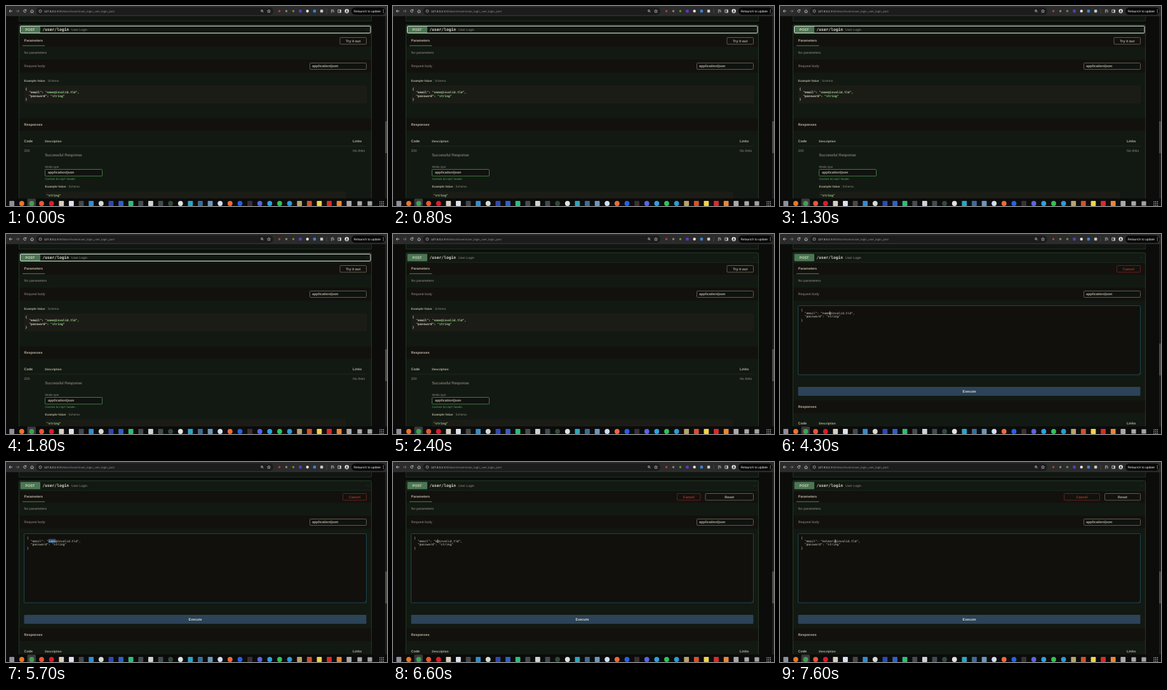
Animation of 600 by 314 pixels, one loop 8 s. Source, as an HTML page:

```html
<!DOCTYPE html>
<html lang="en">
<head>
<meta charset="utf-8">
<title>API docs</title>
<style>
html, body { margin: 0; width: 100%; height: 100%; overflow: hidden; background: #0c0d0b; }
svg { display: block; width: 100vw; height: 100vh; }
text { font: 5.4px "Liberation Sans", Arial, sans-serif; fill: #918d80; text-rendering: geometricPrecision; white-space: pre; }
.b { font-weight: 700; font-size: 5.45px; fill: #b8b29e; }
.s { font-size: 4.7px; }
.mid { text-anchor: middle; }
.mono { font: 4.7px "DejaVu Sans Mono", monospace; fill: #d6d1c0; }
.code { font-weight: 700; }
.str { fill: #98cf8c; }
.box { fill: none; stroke: #5e5c50; }
.band { fill: #12110d; }
.rule { stroke: #263024; stroke-width: .6; }
.ico { fill: none; stroke: #c6c8ca; stroke-width: .9; }
</style>
</head>
<body>
<svg viewBox="0 0 600 314" preserveAspectRatio="none">
  <rect width="600" height="314" fill="#0c0d0b"/>

  <!-- end of the block above -->
  <path d="M20.5 15V23.5H575.5V15" fill="#111611" stroke="#26382a" stroke-width=".8"/>

  <!-- login block -->
  <rect x="20.5" y="29.5" width="555" height="290" rx="1.5" fill="#121912" stroke="#2b432c" stroke-width=".8"/>
  <path d="M21 45H575.5" class="rule" style="stroke:#263a28"/>
  <rect x="22.5" y="31.3" width="31.5" height="11.4" rx="1" fill="#4b7754"/>
  <text x="38" y="39" class="b mid" style="fill:#d8d6c4">POST</text>
  <text x="57.5" y="39.3" class="mono code" style="font-size:6.27px">/user/login</text>
  <text x="103" y="38.9" style="font-size:5.15px">User Login</text>
  <path d="M567 38.2l2.4-2.2 2.4 2.2" fill="none" stroke="#2c382c" stroke-width=".7"/>
  <rect id="focus" x="22.5" y="31.5" width="551.5" height="11" rx="1.2" fill="none" stroke="#e6e6e0"/>

  <rect x="21" y="45.4" width="554" height="18.4" class="band"/>
  <text x="28.5" y="56.4" class="b">Parameters</text>
  <rect x="26" y="61.8" width="35.3" height="1.1" fill="#4a7c52"/>
  <text x="28.5" y="75.3">No parameters</text>
  <rect x="21" y="84" width="554" height="20.5" class="band"/>
  <text x="28.5" y="96.1">Request body</text>
  <rect x="478.5" y="89.5" width="89" height="10" rx="1" class="box" style="fill:#0f120e"/>
  <text x="482" y="96.3" class="b">application/json</text>
  <g id="buttons"></g>

  <g id="view">
    <text x="28.5" y="119.4" class="b s">Example Value</text>
    <path d="M63.6 114.5v6" class="rule"/>
    <text x="66" y="119.4" class="s">Schema</text>
    <rect x="28.5" y="125" width="539.5" height="28" rx="1" fill="#1c1c17"/>
    <text x="30.6" y="131.7" class="mono code">{</text>
    <text x="30.6" y="137.2" class="mono code">  "email": <tspan class="str">"name@invalid.tld"</tspan>,</text>
    <text x="30.6" y="142.8" class="mono code">  "password": <tspan class="str">"string"</tspan></text>
    <text x="30.6" y="148.3" class="mono code">}</text>
  </g>

  <g id="edit">
    <rect id="area" x="28.5" y="112.5" width="539" height="108.5" rx="1" fill="#11100c" stroke-width=".8"/>
    <path d="M564.5 220l2-2M566 220l.6-.6" stroke="#66645c" stroke-width=".4"/>
    <g id="body">
      <rect id="sel" x="66.8" y="120.8" width="11.4" height="6.2" fill="#29537c"/>
      <text x="33" y="120.7" class="mono">{</text>
      <text x="33" y="126" class="mono" id="email"></text>
      <text x="33" y="131.3" class="mono">  "password": "string"</text>
      <text x="33" y="136.5" class="mono">}</text>
      <rect id="caret" y="121.3" width=".7" height="5.6" fill="#e2ddcc"/>
    </g>
    <rect x="28.5" y="240" width="539" height="14" rx="1" fill="#2c4358"/>
    <text x="298" y="248.9" class="b mid" style="fill:#e0dccf">Execute</text>
  </g>

  <!-- responses -->
  <g id="resp">
    <rect x="21" y="176.5" width="554" height="19.5" class="band"/>
    <text x="28.5" y="188.1" class="b">Responses</text>
    <text x="28.5" y="213.6" class="b">Code</text>
    <text x="61.2" y="213.6" class="b" style="font-size:4.8px">Description</text>
    <text x="546" y="213.6" class="b">Links</text>
    <path d="M28.5 220H568" class="rule"/>
    <text x="28.5" y="229">200</text>
    <text x="61.2" y="235.8" style="font-size:6.08px;fill:#a09a88">Successful Response</text>
    <text x="546" y="229" style="font-style:italic">No links</text>
    <text x="61.5" y="253.8" style="font-size:4.45px">Media type</text>
    <rect x="61.5" y="256.5" width="90" height="10.5" rx="1" class="box" style="fill:#0f120e;stroke:#437a49"/>
    <text x="66" y="263.4" class="b">application/json</text>
    <text x="61.5" y="272.9" style="font-size:4.3px;fill:#6da26c">Controls <tspan style="font-family:'DejaVu Sans Mono',monospace">Accept</tspan> header.</text>
    <text x="61.5" y="285.3" class="b s">Example Value</text>
    <path d="M96.3 280.5v6" class="rule"/>
    <text x="98.6" y="285.3" class="s">Schema</text>
    <rect x="61.5" y="291.5" width="474" height="20" rx="1" fill="#1c1c17"/>
    <text x="64" y="298.8" class="mono code str">"string"</text>
  </g>

  <!-- page scrollbar -->
  <rect x="597" y="16" width="3" height="287" fill="#1e1f1d"/>
  <rect id="thumb" x="597" width="3" height="50" fill="#4c4d49"/>

  <!-- browser bar -->
  <rect width="600" height="16" fill="#2b2b2b"/>
  <rect x="47" y="2.2" width="374" height="11.8" rx="5.9" fill="#1c1c1d"/>
  <path class="ico" d="M10 8H5.2m2-2.2L5 8l2.2 2.2M31.4 6.7A2 2 0 1 0 31.6 8.6M31.7 5.3v1.8h-1.8M38.6 8.1l2.4-2.2 2.4 2.2M39.3 7.8v2.4h3.4V7.8"/>
  <path class="ico" d="M15.8 8h4.8m-2-2.2L20.8 8l-2.2 2.2" style="stroke:#77797b"/>
  <circle class="ico" cx="54" cy="8" r="2" style="stroke-width:.7"/>
  <text x="60" y="9.7" style="font-size:4.47px;fill:#8f9297"><tspan fill="#e4e5e7">127.0.0.1</tspan>:8000/docs#/users/user_login_user_login_post</text>
  <circle class="ico" cx="403" cy="7.5" r="1.4"/>
  <path class="ico" d="M404 8.5l1.5 1.5M414 5.6l.7 1.6 1.8.2-1.4 1.2.5 1.8-1.6-1-1.6 1 .5-1.8-1.4-1.2 1.8-.2z" style="stroke-width:.7"/>
  <g id="addons"></g>
  <path d="M505 4v8" stroke="#55575a" stroke-width=".6"/>
  <path class="ico" d="M511.8 6.2h4.2M511.8 8h2.6M511.8 9.8h2M516 7v3M522.8 6h4.6v4.2h-4.6z"/>
  <path d="M525.6 6h2v4.2h-2z" fill="#c6c8ca"/>
  <circle cx="536.7" cy="8" r="3.2" fill="#f0f0ee"/>
  <circle cx="536.7" cy="7" r="1.1" fill="#34363a"/>
  <path d="M534.7 10a2 1.8 0 0 1 4 0z" fill="#34363a"/>
  <rect x="544" y="2.5" width="53.5" height="11.2" rx="5.6" fill="#070707"/>
  <text x="547.6" y="9.8" style="font-size:4.88px;fill:#f4f4f4">Relaunch to update</text>
  <path d="M594.3 5.4v1m0 1.1v1m0 1.1v1" stroke="#e8eaed"/>

  <!-- dock -->
  <rect y="302" width="600" height="12" fill="#0b0b0b"/>
  <rect x="33.5" y="302.5" width="13.5" height="11.5" rx="1.5" fill="#3a3a3a"/>
  <g id="dock"></g>
</svg>
<script>
const $ = id => document.getElementById(id);
const show = (id, on) => $(id).setAttribute('display', on ? 'inline' : 'none');

// "o" is a round icon, "s" a square one
const icon = (spec, x, y, r) => spec[0] === 'o'
  ? `<circle cx="${x}" cy="${y}" r="${r}" fill="${spec.slice(1)}"/>`
  : `<rect x="${x - r}" y="${y - r}" width="${2 * r}" height="${2 * r}" rx=".8" fill="${spec.slice(1)}"/>`;
const row = (list, x, step, y, r) =>
  list.split(' ').map((spec, i) => icon(spec, x + i * step, y, r)).join('');

$('addons').innerHTML = row('o#a8483c o#8c817c o#5f9445', 430.5, 11, 8, 1.8) +
  row('s#5a3cc0 o#e2e2e2 s#3f7fd0 s#c6c8ca', 463.5, 11.2, 8, 2.2);
$('dock').innerHTML = row(
  's#8f8e9c o#ee7428 o#40a055 o#ee5630 o#dc1c28 s#d9cfc0 s#dfe3ee s#45484a s#2f8dd2 o#d4dcd4 ' +
  's#2c49b4 s#2f60c4 s#2bbf76 s#454c4e s#cdd5d6 s#3e4c50 o#2f4a3a o#dfe4e2 s#2aa6c6 s#3c6c96 ' +
  's#6a97bb o#d2dff0 o#f0693a o#2462e4 s#3a3034 o#5865e4 o#2ca2e0 o#2ec456 o#2a9cd8 s#b8a468 ' +
  's#d4512c s#eed648 s#da2a2a s#ee8630 s#a9aaa9', 9.2, 15.62, 310, 3.9) +
  row('s#a9aaa9 s#a2a3a3', 557, 16, 310, 3.6);
for (let i = 0; i < 9; i++)
  $('dock').innerHTML += icon('s#dcdcdc', 589 + i % 3 * 2.7, 307.3 + (i / 3 | 0) * 2.7, .75);

const mix = (a, b, k) => `rgb(${a.map((v, i) => Math.round(v + (b[i] - v) * k))})`;
const grey = [94, 92, 80], red = [104, 32, 28], pale = [184, 178, 158], rose = [170, 54, 44];
const button = (label, x, right, edge, ink) =>
  `<rect x="${x}" y="49.5" width="${right - x}" height="10.5" rx="1" class="box" style="stroke:${edge}"/>` +
  `<text x="${(x + right) / 2}" y="56.5" class="b mid" style="fill:${ink}">${label}</text>`;

function buttons(t) {
  const g = mix(grey, grey, 0), p = mix(pale, pale, 0);
  if (t < 2700) return button('Try it out', 526, 567.5, g, p);
  const k = Math.min(1, (t - 2700) / 300);
  const edge = mix(grey, red, k), ink = mix(pale, rose, k);
  if (t < 6600) return button('Cancel', 530.5, 567.5, edge, ink);
  const u = Math.min(1, (t - 6600) / 300), split = 484 + 19.5 * (1 - (1 - u) ** 2);
  return button('Cancel', 447.5, split, edge, ink) + button('Reset', split + 8, 567.5, g, p);
}

const typed = [[0, 'name'], [6600, 'k'], [6800, 'ke'], [7400, 'kel'], [7500, 'kelmo'], [7600, 'kelmori']];

function draw(t) {
  const editing = t >= 2700, active = t >= 4300;
  const user = typed.filter(([at]) => t >= at).pop()[1];
  show('focus', t < 2400);
  show('view', !editing);
  show('edit', editing);
  show('sel', t >= 5700 && t < 6600);
  show('caret', active && (t < 5300 || t >= 6600));
  $('resp').setAttribute('transform', `translate(0 ${editing ? 85 : 0})`);
  $('thumb').setAttribute('y', editing ? 172 : 181);
  $('area').setAttribute('stroke', active ? '#215360' : '#191914');
  $('body').setAttribute('transform', active ? '' : 'translate(-.8 -.8)');
  $('email').textContent = `  "email": "${user}@invalid.tld",`;
  $('caret').setAttribute('x', 33 + (12 + user.length) * 2.83);
  $('buttons').innerHTML = buttons(t);
}

const start = performance.now();
let last = -1;
function tick() {
  const t = Math.floor((performance.now() - start) % 8000 / 100) * 100;
  if (t !== last) draw(last = t);
  requestAnimationFrame(tick);
}
tick();
</script>
</body>
</html>
```
